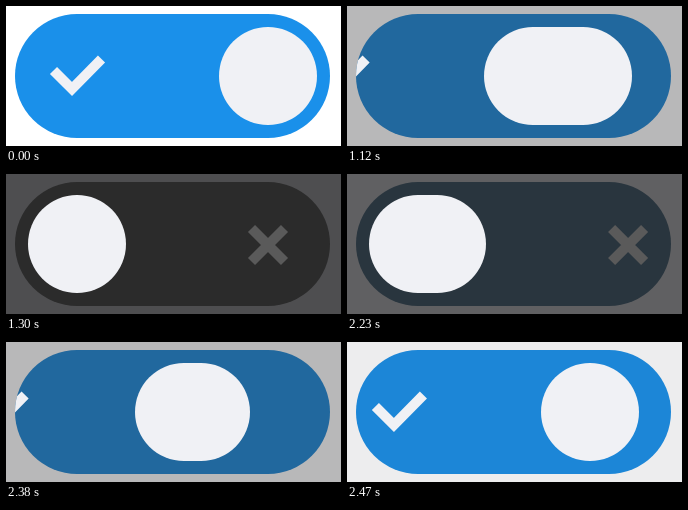
An HTML page that plays this animation: 335 by 140 pixels, repeating every 2500 ms.

```html
<!DOCTYPE html>
<html lang="en">
<head>
<meta charset="utf-8">
<title>Toggle switch</title>
<style>
  html, body { margin: 0; width: 100%; height: 100%; overflow: hidden; background: #fff; }
  svg { display: block; width: 335px; height: 140px; }
</style>
</head>
<body>
<svg viewBox="0 0 335 140">
  <clipPath id="pill"><rect x="9" y="8" width="315" height="124" rx="62"/></clipPath>
  <rect id="page" width="335" height="140"/>
  <rect id="track" x="9" y="8" width="315" height="124" rx="62"/>
  <g clip-path="url(#pill)" fill="none" stroke-width="10">
    <path id="check" d="M47.5 64.5 66 83 95.5 53" stroke="#f0f1f5"/>
    <path id="cross" d="M245.5 54.5l33 33m0-33l-33 33" stroke="#5a5a5a"/>
  </g>
  <rect id="knob" y="21" height="98" rx="49" fill="#f0f1f5"/>
</svg>
<script>
const LOOP = 2500, STEP = 30, STEPS = 10, TRAVEL = 191;
const OFF_START = 1000, ON_START = 2200;
const KNOB_ON = 213, KNOB_OFF = 22, KNOB_SIZE = 98;

// Distance covered by the front and back edge of the knob at each step
const FRONT = [0, 19, 38, 57, 76, 100, 124, 139, 154, 172, 191];
const BACK = [0, 0, 2, 10, 26, 65, 107, 130, 151, 172, 191];

const PAGE = [[255, 255, 255], [78, 78, 80]];
const TRACK = [[26, 144, 234], [43, 43, 43]];

const el = id => document.getElementById(id);
const [page, track, check, cross, knob] = ['page', 'track', 'check', 'cross', 'knob'].map(el);

const mix = ([a, b], p) => `rgb(${a.map((v, i) => Math.round(v + (b[i] - v) * p))})`;
const shift = (node, x) => node.setAttribute('transform', `translate(${x} 0)`);
const stepAt = (t, start) => Math.max(0, Math.min(STEPS, Math.floor((t - start) / STEP)));

function draw(time) {
  const t = time % LOOP;
  const turningOn = t >= ON_START;
  const k = stepAt(t, turningOn ? ON_START : OFF_START);
  const off = turningOn ? 1 - k / STEPS : k / STEPS;

  const left = turningOn ? KNOB_OFF + BACK[k] : KNOB_ON - FRONT[k];
  knob.setAttribute('x', left);
  knob.setAttribute('width', KNOB_SIZE + FRONT[k] - BACK[k]);

  page.setAttribute('fill', mix(PAGE, off));
  track.setAttribute('fill', mix(TRACK, off));
  shift(check, -TRAVEL * off);
  shift(cross, TRAVEL * (1 - off));
}

const begin = performance.now();
function tick() {
  draw(performance.now() - begin);
  requestAnimationFrame(tick);
}
tick();
</script>
</body>
</html>
```
